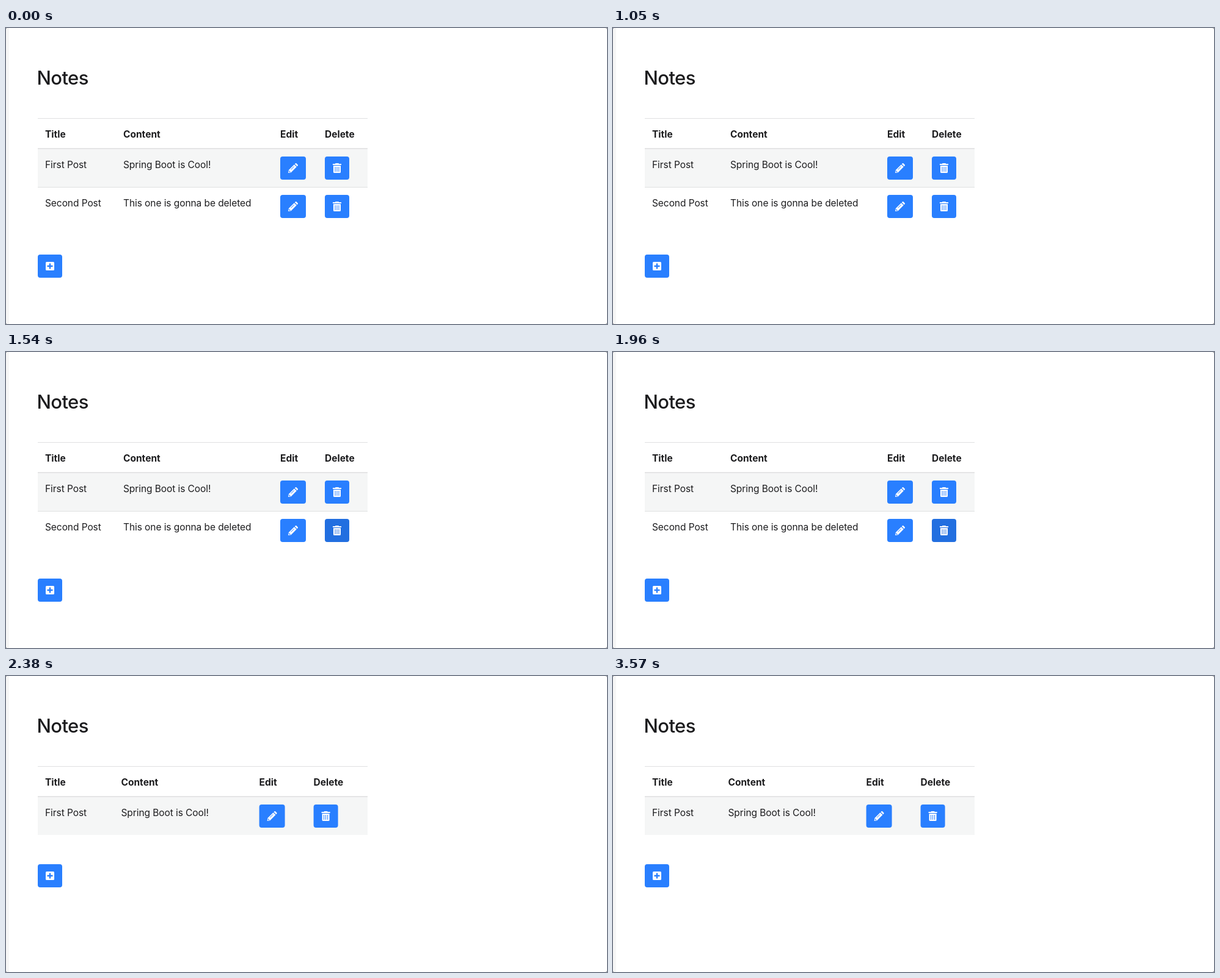
These frames come from a looping animation (984x486 px, 3640 ms). An HTML page:

```html
<!DOCTYPE html>
<html lang="en">
<head>
<meta charset="utf-8">
<title>Notes</title>
<style>
  html, body { margin: 0; width: 100%; height: 100%; overflow: hidden; background: #8a8a8a; }
  svg { display: block; width: 984px; height: 486px; }
  text { font: 400 15.5px Inter, "Open Sans", sans-serif; letter-spacing: -.07px; fill: #1c1c1e; }
  .head text { font-weight: 700; letter-spacing: 0; }
  .title { font-size: 31px; font-weight: 500; letter-spacing: -.6px; }
  .button { color: #297fff; }
  .button > rect { fill: currentColor; }
  .button use { fill: #fff; color: inherit; }
  .cut { fill: none; stroke: currentColor; }
</style>
</head>
<body>
<svg viewBox="0 0 984 486">
  <defs>
    <g id="pencil">
      <path d="M-8 8L-7.2 3.3 1.9-5.8 5.8-1.9-3.3 7.2ZM2.8-6.7L3.9-7.7Q4.7-8.4 5.5-7.7L7.7-5.5Q8.4-4.7 7.7-3.9L6.7-2.8Z"/>
      <path class="cut" d="M-3.6 2.5L1.6-2.7M-6.2 4.2V6.2H-4.2"/>
    </g>
    <g id="trash">
      <path d="M-7-7H-3.2L-2.4-8H2.4L3.2-7H7V-5H-7ZM-6-4H6V6.5Q6 8 4.5 8H-4.5Q-6 8-6 6.5Z"/>
      <path class="cut" d="M-3-2V6M0-2V6M3-2V6"/>
    </g>
    <g id="plus">
      <rect x="-7" y="-7" width="14" height="14" rx="1.6"/>
      <path class="cut" stroke-width="2.4" d="M-4.5 0H4.5M0-4.5V4.5"/>
    </g>
  </defs>
  <rect width="984" height="486" rx="3" fill="#fff"/>
  <path d="M3 0H5V486H3Q0 486 0 483V3Q0 0 3 0" fill="#f6f6f6"/>
  <text class="title" x="50.5" y="93">Notes</text>
  <path d="M52 148.5H592" stroke="#dfe0e1"/>
  <path d="M52 198H592" stroke="#dcddde" stroke-width="1.6"/>
  <rect x="52" y="199" width="540" height="62" fill="#f5f6f6"/>
  <g id="table"></g>
  <g id="add"></g>
</svg>
<script>
const LOOP = 3640, STEP = 70, REMOVED = 2380;
const NORMAL = [41, 127, 255], HOVER = [34, 111, 224], ACTIVE = [31, 100, 204];
const wide = [64, 192, 449, 522], narrow = [64, 188.5, 414.6, 503.6];
const table = document.getElementById('table');
const add = document.getElementById('add');

const label = (x, y, s) => `<text x="${x}" y="${y}">${s}</text>`;
const button = (x, y, w, icon) => `<g class="button" transform="translate(${x} ${y})">
  <rect width="${w}" height="38" rx="4"/><use href="#${icon}" x="${w / 2}" y="19"/></g>`;

const row = (cols, y, title, content) =>
  label(cols[0], y + 18.5, title) + label(cols[1], y + 18.5, content) +
  button(cols[2], y, 42, 'pencil') + button(cols[3], y, 40, 'trash');

function layout(full) {
  const cols = full ? wide : narrow;
  const names = ['Title', 'Content', 'Edit', 'Delete'];
  table.innerHTML = '<g class="head">' + names.map((s, i) => label(cols[i], 179.5, s)).join('') + '</g>' +
    row(cols, 211, 'First Post', 'Spring Boot is Cool!') +
    (full ? '<path d="M52 261.5H592" stroke="#dfe0e1"/>' +
      row(cols, 274, 'Second Post', 'This one is gonna be deleted') : '');
  add.innerHTML = button(52, full ? 372 : 309, 40, 'plus');
}

const ramp = (t, from, length) => Math.min(1, Math.max(0, (t - from) / length));
const mix = (a, b, k) => a.map((v, i) => v + (b[i] - v) * k);

let shown = null;
function draw(now) {
  const t = Math.floor(now % LOOP / STEP) * STEP;
  const full = t < REMOVED;
  if (full !== shown) layout(shown = full);
  if (full) {
    const hovered = mix(NORMAL, HOVER, ramp(t, 1400, 140));
    const color = mix(hovered, ACTIVE, ramp(t, 2170, 140));
    table.lastElementChild.style.color = `rgb(${color.map(Math.round)})`;
  }
  requestAnimationFrame(() => draw(performance.now()));
}
draw(0);
</script>
</body>
</html>
```
